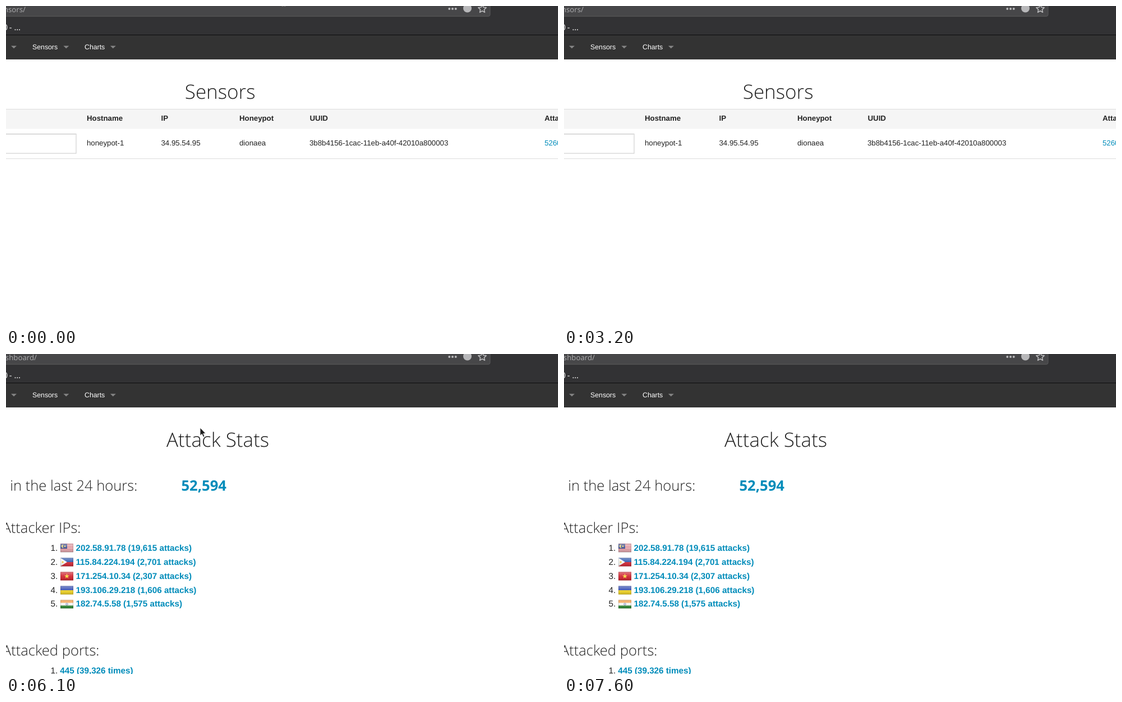
An HTML page that plays this animation: 984 by 569 pixels, repeating every 8200 ms.

```html
<!DOCTYPE html>
<html lang="en">
<head>
<meta charset="utf-8">
<title>Sensors</title>
<style>
  html, body { margin: 0; width: 100%; height: 100%; overflow: hidden; background: #fff; }
  svg { display: block; width: 984px; height: 569px; }
  text { font: 13.26px "Liberation Sans", Arial, sans-serif; fill: #222; text-rendering: geometricPrecision; white-space: pre; }
  .nav text { font-size: 12.31px; fill: #fff; }
  .bold text, text.bold { font-weight: bold; }
  .list text { font-size: 15.23px; }
  text.link { fill: #008cba; }
  text.title, text.sub { font-family: "Open Sans", "Noto Sans", sans-serif; font-weight: 300; }
  text.title { font-size: 35.04px; }
  text.sub { font-size: 25.57px; }
  .end { text-anchor: end; }
  text.count { font-weight: 700; fill: #008cba; }
  .chrome text { font: 13.2px "Noto Sans", "Open Sans", sans-serif; fill: #a8a8aa; }
  .chrome .bookmark { font-size: 14.5px; fill: #f4f4f4; }
  .off { display: none; }
</style>
</head>
<body>
<svg viewBox="0 0 984 569">
  <defs>
    <linearGradient id="gloss" x2="0" y2="1">
      <stop offset="0" stop-color="#fff" stop-opacity=".4"/>
      <stop offset=".5" stop-color="#fff" stop-opacity=".1"/>
      <stop offset="1" stop-color="#000" stop-opacity=".15"/>
    </linearGradient>
    <path id="caret" d="M-5 -2.3H5L0 2.6Z" fill="#fff" fill-opacity=".4"/>
    <path id="beamLine" d="M-3.5 -7.5H-1.2L0 -6.7L1.2 -7.5H3.5M-3.5 7.5H-1.2L0 6.7L1.2 7.5H3.5M0 -6.7V6.7" fill="none"/>
    <g id="sheen">
      <rect width="23" height="15" fill="url(#gloss)"/>
      <rect x=".5" y=".5" width="22" height="14" fill="none" stroke="#000" stroke-opacity=".15"/>
    </g>
  </defs>

  <rect width="984" height="569" fill="#fff"/>

  <g id="sensors">
    <text class="title" x="318.8" y="165">Sensors</text>
    <rect y="184" width="984" height="34.5" fill="#f5f5f5"/>
    <path d="M0 183.5H984M0 271.5H984" stroke="#ddd"/>
    <g class="bold">
      <text x="144" y="204">Hostname</text>
      <text x="276.5" y="204">IP</text>
      <text x="416" y="204">Honeypot</text>
      <text x="541.5" y="204">UUID</text>
      <text x="960" y="204">Attacks</text>
    </g>
    <rect x="-9.5" y="227.5" width="134.5" height="34.5" fill="#fff" stroke="#c8c8c8"/>
    <path d="M0 228.5H124.5" stroke="#eee"/>
    <text x="144" y="248">honeypot-1</text>
    <text x="276.5" y="248">34.95.54.95</text>
    <text x="416" y="248">dionaea</text>
    <text x="541" y="248">3b8b4156-1cac-11eb-a40f-42010a800003</text>
    <text class="link" x="960" y="248">5260</text>
  </g>

  <g id="stats" class="off">
    <text class="title" x="286" y="165">Attack Stats</text>
    <text class="sub end" x="234.3" y="242.6">in the last 24 hours:</text>
    <text class="sub count" x="312.5" y="242.6">52,594</text>
    <text class="sub end" x="133.4" y="317.6">Attacker IPs:</text>
    <text class="sub end" x="166.4" y="536">Attacked ports:</text>
    <g class="list">
      <g transform="translate(0 349.6)">
        <text x="79.5">1.</text><text class="bold link" x="124.5">202.58.91.78 (19,615 attacks)</text>
        <g transform="translate(97 -12)">
          <path fill="#f1e6e8" d="M0 0H23V15H0Z"/>
          <path d="M0 .5H23M0 2.6H23M0 4.8H23M0 6.9H23M0 9.1H23M0 11.2H23M0 13.4H23" stroke="#d0505c" stroke-width="1.1"/>
          <path fill="#34498f" d="M0 0H12V8.5H0Z"/>
          <path d="M5.6 1.7A2.8 2.8 0 1 0 5.6 6.8A3.2 3.2 0 0 1 5.6 1.7Z" fill="#e8cf62"/>
          <circle cx="8" cy="4.3" r="1.4" fill="#e8cf62"/>
          <use href="#sheen"/>
        </g>
      </g>
      <g transform="translate(0 374.5)">
        <text x="79.5">2.</text><text class="bold link" x="124.5">115.84.224.194 (2,701 attacks)</text>
        <g transform="translate(97 -12)">
          <path fill="#2452ad" d="M0 0H23V7.5H0Z"/>
          <path fill="#d02432" d="M0 7.5H23V15H0Z"/>
          <path fill="#f5f5f5" d="M0 0L12 7.5L0 15Z"/>
          <circle cx="4" cy="7.5" r="1.7" fill="#f0c53a"/>
          <use href="#sheen"/>
        </g>
      </g>
      <g transform="translate(0 399.5)">
        <text x="79.5">3.</text><text class="bold link" x="124.5">171.254.10.34 (2,307 attacks)</text>
        <g transform="translate(97 -12)">
          <path fill="#d0202c" d="M0 0H23V15H0Z"/>
          <path fill="#fbdc3c" d="M11.5 3l1.1 3.2h3.4l-2.7 2 1 3.3-2.8-2-2.8 2 1-3.3-2.7-2h3.4Z"/>
          <use href="#sheen"/>
        </g>
      </g>
      <g transform="translate(0 424.5)">
        <text x="79.5">4.</text><text class="bold link" x="124.5">193.106.29.218 (1,606 attacks)</text>
        <g transform="translate(97 -12)">
          <path fill="#2b45b0" d="M0 0H23V7.5H0Z"/>
          <path fill="#f0d322" d="M0 7.5H23V15H0Z"/>
          <use href="#sheen"/>
        </g>
      </g>
      <g transform="translate(0 449.3)">
        <text x="79.5">5.</text><text class="bold link" x="124.5">182.74.5.58 (1,575 attacks)</text>
        <g transform="translate(97 -12)">
          <path fill="#f4f4f4" d="M0 0H23V15H0Z"/>
          <path fill="#f0953c" d="M0 0H23V5H0Z"/>
          <path fill="#2f8b35" d="M0 10H23V15H0Z"/>
          <circle cx="11.5" cy="7.5" r="1.7" fill="none" stroke="#5967a8" stroke-width=".9"/>
          <use href="#sheen"/>
        </g>
      </g>
      <text x="79.5" y="568">1.</text><text class="bold link" x="96.3" y="568">445 (39,326 times)</text>
    </g>
  </g>

  <g class="chrome">
    <rect width="984" height="52" fill="#323234"/>
    <rect x="-10" y="-10" width="873" height="28.3" rx="3" fill="#474749" stroke="#59595b"/>
    <text id="url" class="end" x="35" y="10.5">nsors/</text>
    <g fill="#b8b8ba">
      <circle cx="790.3" cy="5" r="2"/><circle cx="796" cy="5" r="2"/><circle cx="801.7" cy="5" r="2"/>
      <circle cx="822.5" cy="4" r="7.5"/>
    </g>
    <path d="M849 -2.3l2.1 4.6 5 .6-3.7 3.4 1 5-4.4-2.5-4.4 2.5 1-5-3.7-3.4 5-.6Z" fill="none" stroke="#b8b8ba" stroke-width="1.6" stroke-linejoin="round"/>
    <text class="bookmark" x="-5.2" y="43">0</text>
    <text class="bookmark" x="5.8" y="43">-</text>
    <text class="bookmark" x="14.5" y="43">…</text>
    <path d="M0 51.5H984" stroke="#0c0c0d"/>
  </g>

  <g class="nav">
    <rect y="52" width="984" height="43" fill="#333"/>
    <g id="sensorMenu" class="off">
      <rect x="33" y="52" width="93.5" height="43" fill="#272727"/>
      <rect x="33" y="95" width="102" height="70" fill="#333"/>
      <text x="47.3" y="116">View sensors</text>
      <text x="47.3" y="151">Add sensor</text>
    </g>
    <g id="chartMenu" class="off">
      <rect x="126.5" y="52" width="83.5" height="43" fill="#272727"/>
      <rect x="126.5" y="95" width="217.5" height="140.7" fill="#333"/>
      <text x="140" y="116">Kippo/Cowrie Top Passwords</text>
      <text x="140" y="151">Kippo/Cowrie Top Users</text>
      <text x="140" y="186">Kippo/Cowrie Top User/Passwords</text>
      <text x="140" y="221">Kippo/Cowrie Top Attackers</text>
    </g>
    <text x="47" y="77">Sensors</text>
    <text x="140" y="77">Charts</text>
    <use href="#caret" x="14" y="73"/><use href="#caret" x="107.3" y="73"/><use href="#caret" x="190.8" y="73"/>
  </g>

  <g id="cursor">
    <g id="beam">
      <use href="#beamLine" stroke="#fff" stroke-width="3"/>
      <use href="#beamLine" stroke="#111" stroke-width="1.2"/>
    </g>
    <path id="arrow" d="M0 0V14.3L3.3 11.3L5.6 16.6L8 15.6L5.8 10.4H10Z" fill="#1c1c1c" stroke="#fff" stroke-width=".9"/>
    <path id="hand" d="M-1.6 1Q-1.6 -1 0 -1Q1.6 -1 1.6 1V4.6L7 6Q9 6.7 8.8 9L8 15H-1L-6 8.6Q-5.6 6.4 -3.4 7.6L-1.6 9Z" fill="#fff" stroke="#111" stroke-width=".9"/>
  </g>
</svg>
<script>
  const LOOP = 8200;
  const $ = id => document.getElementById(id);
  const show = (id, on) => $(id).classList.toggle("off", !on);

  // time, pointer shape, x, y, open menu
  const pointer = [
    [0, "beam", 495, -8.8],
    [1000, "beam", 495, -7.5],
    [1900, "beam", 358, 12],
    [2000, "arrow", 300, 19],
    [2100, "arrow", 238, 25],
    [2200, "arrow", 180, 31],
    [2300, "arrow", 130, 41],
    [2400, "hand", 90, 60, "sensorMenu"],
    [2500, "hand", 75, 65, "sensorMenu"],
    [3000, "hand", 71, 64, "sensorMenu"],
    [3100, "arrow", 16, 268],
    [3200],
    [4900, "arrow", 253, 132],
    [5900, "arrow", 290, 126],
    [6000, "arrow", 325, 124],
    [6100, "arrow", 346, 131],
    [7300, "arrow", 258, 101],
    [7400, "hand", 190, 64, "chartMenu"],
    [7500, "arrow", 123, 18],
    [7600]
  ];

  function draw(time) {
    const t = time % LOOP;
    const [, shape, x = 0, y = 0, menu] = pointer.findLast(p => p[0] <= t);
    for (const id of ["beam", "arrow", "hand"]) show(id, id === shape);
    for (const id of ["sensorMenu", "chartMenu"]) show(id, id === menu);
    $("cursor").setAttribute("transform", `translate(${x} ${y})`);

    show("sensors", t < 4900);
    show("stats", t >= 4900);
    $("url").textContent = t < 4800 ? "nsors/" : "shboard/";
    $("url").setAttribute("x", t < 4800 ? 35 : 55);
  }

  const start = performance.now();
  function tick() {
    draw(performance.now() - start);
    requestAnimationFrame(tick);
  }
  tick();
</script>
</body>
</html>
```
